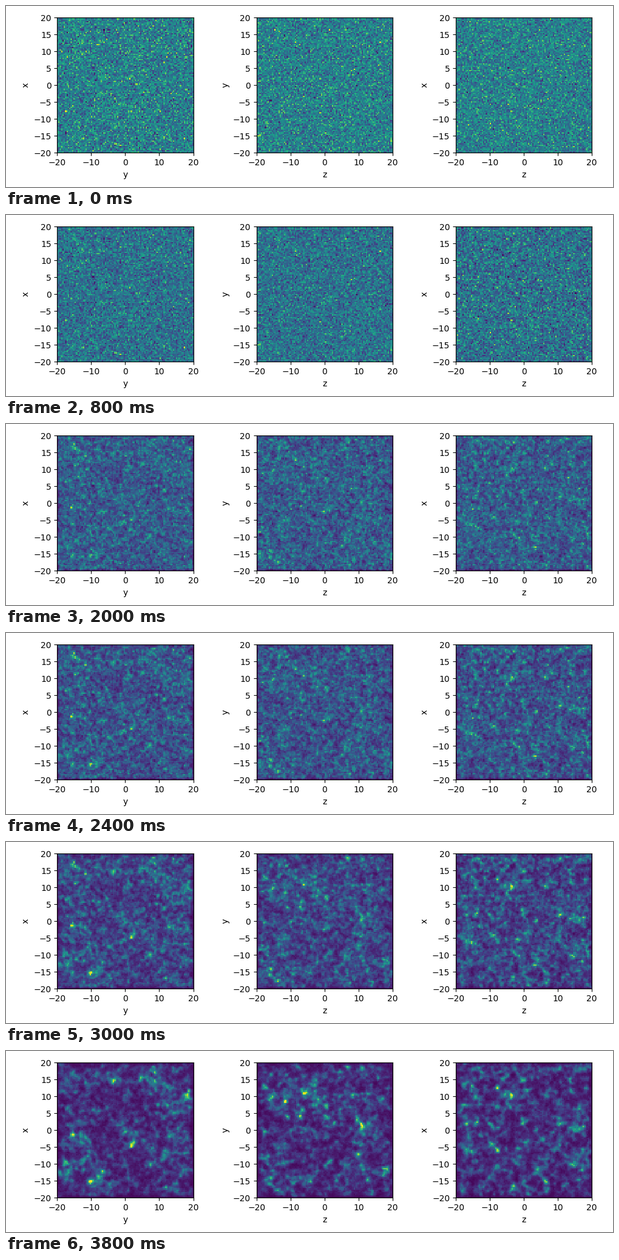
Animation, 1000 px wide and 300 px high, one loop 4000 ms. Source, as a matplotlib script:

```python
import numpy as np
import matplotlib.pyplot as plt
from matplotlib.animation import FuncAnimation

W, H, DPI = 1000, 300, 100
FRAMES, INTERVAL = 20, 200
BINS, HALF = 100, 20
SIDE, LEFT, BOTTOM, STEP = 224.2, 84.3, 56.6, 328.35

plt.rcParams["font.family"] = "DejaVu Sans"

# Distance of every cell from the nearest wall, in cells
cell = np.arange(BINS) + 0.5
edge = np.minimum(cell, BINS - cell)
wall = np.minimum(edge[:, None], edge[None, :])

freq = 2 * np.pi * np.fft.fftfreq(BINS)
K2 = freq[:, None] ** 2 + freq[None, :] ** 2

rng = np.random.default_rng(12)
waves = np.fft.fft2(rng.standard_normal((3, 2, BINS, BINS)))
shots = rng.standard_normal((3, 2, BINS, BINS))


def turn(pair, angle):
    """Blend two noise fields so that they change slowly with the angle."""
    return pair[0] * np.cos(angle) + pair[1] * np.sin(angle)


def density(panel, i):
    """Projected particle density, scaled to 0..1, clustering with time."""
    u = i / (FRAMES - 1)
    blur = 0.9 * u**1.5
    contrast = 0.08 + 0.5 * u**1.6
    rim = 0.02 + 3 * u**2
    level = 0.44 - 0.275 * u

    kernel = sum(np.exp(-K2 * (m * blur) ** 2 / 2) for m in (1, 2, 4))
    field = np.fft.ifft2(turn(waves[panel], 0.1 * i) * kernel).real
    field = (field - field.mean()) / field.std()

    rho = np.exp(contrast * field) * np.tanh(wall / rim)
    rho += 0.13 * u * np.sqrt(rho) * turn(shots[panel], 0.3 * i)
    rho = np.maximum(rho, 0)

    low = rho.min()
    return np.clip((rho - low) * level / (rho.mean() - low), 0, 1)


fig = plt.figure(figsize=(W / DPI, H / DPI), dpi=DPI, facecolor="white")
images = []
for panel, (xname, yname) in enumerate(["yx", "zy", "zx"]):
    left = LEFT + panel * STEP
    ax = fig.add_axes([left / W, BOTTOM / H, SIDE / W, SIDE / H])
    images.append(ax.imshow(
        density(panel, 0), cmap="viridis", vmin=0, vmax=1, origin="lower",
        extent=(-HALF, HALF, -HALF, HALF), aspect="auto",
        interpolation="nearest"))
    ax.set_xticks(range(-HALF, HALF + 1, 10))
    ax.set_yticks(range(-HALF, HALF + 1, 5))
    ax.set_xlabel(xname)
    ax.set_ylabel(yname)


def update(i):
    for panel, im in enumerate(images):
        im.set_data(density(panel, i))
    return images


anim = FuncAnimation(fig, update, frames=FRAMES, interval=INTERVAL,
                     init_func=lambda: update(0), repeat=True, repeat_delay=0)
plt.show()
```
